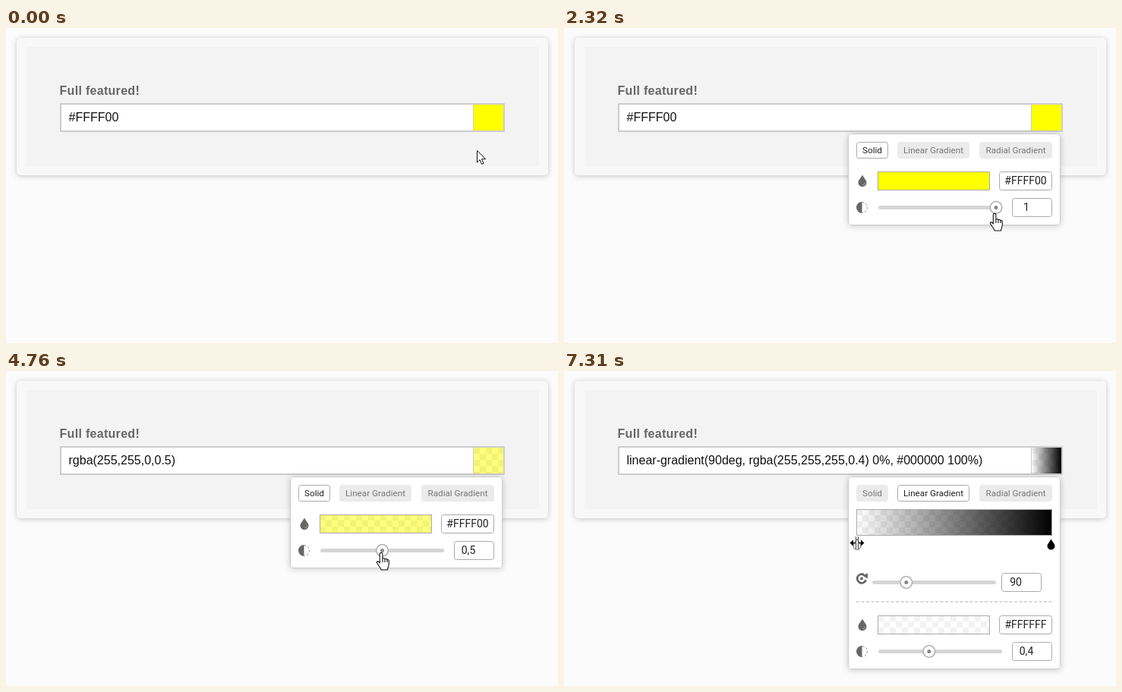
Write an HTML page with a canvas that moves like this. It is 727x415 px and loops after 8 s.

```html
<!DOCTYPE html>
<html lang="en">
<head>
<meta charset="utf-8">
<title>Color picker</title>
<style>
html, body { margin: 0; width: 100%; height: 100%; overflow: hidden; background: #fbfbfb; }
canvas { display: block; }
</style>
</head>
<body>
<canvas id="stage" width="727" height="415"></canvas>
<script>
const ctx = document.getElementById('stage').getContext('2d');
const LOOP = 8000;
const UI = 'Roboto, sans-serif', PAGE = '"Liberation Sans", Arial, sans-serif';

// Pointer path: step, x, y of the hot spot. One step lasts about 111 ms.
const POINTER = [
  [0, 620, 161], [1, 621, 156], [3, 626, 134], [5, 631, 115], [7, 631, 115], [10, 643, 121],
  [11, 644, 122], [13, 644, 122], [15, 628, 126], [18, 588, 210], [20, 567, 244],
  [23, 569, 239], [24, 565, 239], [28, 480, 239], [30, 437, 239], [31, 470, 239],
  [34, 483, 239], [40, 486, 239], [41, 494, 239], [42, 494, 239], [45, 515, 223],
  [48, 533, 193], [51, 482, 169], [53, 482, 169], [54, 482, 168], [57, 482, 166],
  [59, 482, 167], [63, 387, 226], [64, 387, 226], [65, 386, 226]
];
const PANEL = [[11, 0], [12, 0.6], [13, 0.9], [14, 1]];
const PRESSES = [[10, 11], [24, 40], [56, 57]];

const HAND = new Path2D('M-1.7 13V2A1.8 1.8 0 0 1 1.9 2V8.5A1.7 1.7 0 0 1 5 9A1.7 1.7 0 0 1 8 10A1.4 1.4 0 0 1 10.3 11.2V15C10.3 18 8.8 19 8.5 23H0C-.5 20-3 18-5.5 13.8C-6.2 11.5-3.8 11-1.7 14ZM1.9 8.5V13M5 9.5V13M8 10.5V13');
const ARROW = new Path2D('M.5 .5V16L4.1 12.6L6.5 18.4L8.9 17.3L6.5 11.7H11.5Z');
const RESIZE = new Path2D('M-9.5 0L-5-4.5V-1H-2V1H-5V4.5ZM9.5 0L5-4.5V-1H2V1H5V4.5ZM-2-8.5H-1V8.5H-2ZM1-8.5H2V8.5H1Z');
const DROP = new Path2D('M0-8C2-4 5.5-1 5.5 2.2A5.5 5.5 0 0 1-5.5 2.2C-5.5-1-2-4 0-8Z');

function track(keys, step) {
  const next = keys.findIndex(k => k[0] > step);
  if (next === 0) return keys[0].slice(1);
  if (next < 0) return keys[keys.length - 1].slice(1);
  const a = keys[next - 1], b = keys[next];
  const p = (step - a[0]) / (b[0] - a[0]);
  return a.slice(1).map((v, i) => v + (b[i + 1] - v) * p);
}

function box(x, y, w, h, r, fill, stroke) {
  ctx.beginPath();
  const inset = stroke ? 0.5 : 0;
  ctx.roundRect(x + inset, y + inset, w - 2 * inset, h - 2 * inset, r);
  if (fill) { ctx.fillStyle = fill; ctx.fill(); }
  if (stroke) { ctx.strokeStyle = stroke; ctx.lineWidth = 1; ctx.stroke(); }
}

function shadowBox(x, y, w, h, r, fill, blur, strength) {
  ctx.save();
  ctx.shadowColor = `rgba(0,0,0,${strength})`;
  ctx.shadowBlur = blur;
  ctx.shadowOffsetY = 1;
  box(x, y, w, h, r, fill);
  ctx.restore();
}

function text(str, x, y, font, color, align = 'left') {
  ctx.font = font;
  ctx.fillStyle = color;
  ctx.textAlign = align;
  ctx.fillText(str, x, y);
}

function circle(x, y, r, fill, stroke, width = 1.3) {
  ctx.beginPath();
  ctx.arc(x, y, r, 0, 2 * Math.PI);
  if (fill) { ctx.fillStyle = fill; ctx.fill(); }
  if (stroke) { ctx.strokeStyle = stroke; ctx.lineWidth = width; ctx.stroke(); }
}

function shape(path, x, y, fill, stroke, width = 1.1, scale = 1) {
  ctx.save();
  ctx.translate(x, y);
  ctx.scale(scale, scale);
  ctx.lineJoin = 'round';
  if (stroke) { ctx.strokeStyle = stroke; ctx.lineWidth = width; }
  if (fill) { ctx.fillStyle = fill; ctx.fill(path); }
  if (stroke) ctx.stroke(path);
  ctx.restore();
}

function checkered(x, y, w, h, fill) {
  ctx.save();
  ctx.beginPath();
  ctx.rect(x, y, w, h);
  ctx.clip();
  ctx.fillStyle = '#fff';
  ctx.fillRect(x, y, w, h);
  ctx.fillStyle = '#e8e8e8';
  for (let row = 0; row * 8 < h; row++)
    for (let col = row % 2; col * 8 < w; col += 2) ctx.fillRect(x + col * 8, y + row * 8, 8, 8);
  ctx.fillStyle = fill;
  ctx.fillRect(x, y, w, h);
  ctx.restore();
}

// Translucent white to black, blended with premultiplied alpha as CSS does.
function fade(x, w) {
  const g = ctx.createLinearGradient(x, 0, x + w, 0);
  for (let p = 0; p <= 1; p += 0.125) {
    const alpha = 0.4 + 0.6 * p, grey = Math.round(102 * (1 - p) / alpha);
    g.addColorStop(p, `rgba(${grey},${grey},${grey},${alpha})`);
  }
  return g;
}

function page(value, paint) {
  ctx.fillStyle = '#fbfbfb';
  ctx.fillRect(0, 0, 727, 415);
  shadowBox(14, 13, 700, 181, 5, '#f8f8f8', 7, 0.22);
  box(27, 25, 675, 157, 0, '#f3f3f3');
  ctx.letterSpacing = '0.3px';
  text('Full featured!', 70.5, 88, `bold 16px ${PAGE}`, '#666');
  ctx.letterSpacing = '0px';
  box(71, 99, 586, 38, 1, '#ccc');
  box(73, 101, 542, 34, 0, '#fff');
  text(value, 82.5, 123, `16px ${PAGE}`, '#111');
  checkered(616, 101, 39, 34, paint);
}

function tab(label, x, w, active) {
  box(x, 150, w, 22, 3, active ? '#fff' : '#ebebeb', active ? '#aaa' : '#ebebeb');
  text(label, x + w / 2, 165, `11.7px ${UI}`, active ? '#222' : '#777', 'center');
}

function field(value, x, y, w, shift = 0) {
  box(x, y, w, 25, 3, '#fff', '#aaa');
  text(value, x + w / 2 - shift, y + 17, `14px ${UI}`, '#222', 'center');
}

function slider(x, y, ratio, value) {
  box(x, y - 2.5, 163, 5, 2.5, '#d5d5d5');
  const knob = x + 8 + 147 * ratio;
  circle(knob, y, 7.8, '#fff', '#a5a5a5');
  circle(knob, y, 2.5, '#888');
  field(value, x === 414 ? 590 : 576, Math.round(y - 12.5), 53, 7.5);
}

function colorRows(dy, hex, paint, alpha) {
  shape(DROP, 393, 201.5 + dy, '#666');
  ctx.beginPath();
  ctx.arc(393, 203.5 + dy, 3.5, 0.1, 1.5);
  ctx.strokeStyle = '#aaa';
  ctx.lineWidth = 1;
  ctx.stroke();
  checkered(413, 189 + dy, 148, 25, paint);
  box(413, 189 + dy, 148, 25, 0, null, '#aaa');
  field(hex, 573, 189 + dy, 70);

  const y = 236.5 + dy;
  ctx.beginPath();
  ctx.arc(392.5, y, 7.5, Math.PI / 2, Math.PI * 1.5);
  ctx.fillStyle = '#666';
  ctx.fill();
  ctx.beginPath();
  ctx.arc(392.5, y, 6.9, -Math.PI / 2, Math.PI / 2);
  ctx.strokeStyle = '#888';
  ctx.setLineDash([3, 2]);
  ctx.stroke();
  ctx.setLineDash([]);
  slider(414, y, alpha, String(alpha).replace('.', ','));
}

function gradientControls() {
  checkered(385, 182, 258, 35, fade(385, 258));
  box(385, 182, 258, 35, 0, null, '#aaa');
  shape(DROP, 386, 228.5, '#f5f5f5', '#777', 1.2, 0.9);
  shape(DROP, 641.5, 228.5, '#000', '#fff', 0.6, 0.95);

  ctx.beginPath();
  ctx.arc(392, 273.5, 5.8, 0.3, 5.3);
  ctx.strokeStyle = '#666';
  ctx.lineWidth = 2.8;
  ctx.stroke();
  shape(new Path2D('M1-4L8-7V0Z'), 392, 273.5, '#666');
  circle(392, 273.5, 2, '#666');
  slider(406, 278.5, 0.25, '90');

  ctx.beginPath();
  ctx.moveTo(385, 304);
  ctx.lineTo(643, 304);
  ctx.strokeStyle = '#ccc';
  ctx.lineWidth = 1.5;
  ctx.setLineDash([4, 2.5]);
  ctx.stroke();
  ctx.setLineDash([]);
}

function panel(shown, linear, paint, alpha) {
  if (!shown) return;
  const scale = 0.86 + 0.14 * shown, height = linear ? 254 : 121;
  ctx.save();
  ctx.globalAlpha = shown;
  ctx.translate(514, 199.5);
  ctx.scale(scale, scale);
  ctx.translate(-514, -199.5);
  shadowBox(374, 139, 280, height, 4, '#fff', 8, 0.2);
  box(374, 139, 280, height, 4, '#fff', '#ccc');
  tab('Solid', 385, 42, !linear);
  tab('Linear Gradient', 439, 95, linear);
  tab('Radial Gradient', 547, 96, false);
  if (linear) {
    gradientControls();
    colorRows(133, '#FFFFFF', 'rgba(255,255,255,0.4)', 0.4);
  } else {
    colorRows(0, '#FFFF00', paint, alpha);
  }
  ctx.restore();
}

function pointer(step, x, y) {
  if (PRESSES.some(([from, to]) => step >= from && step <= to))
    circle(x, y - 3, 11, 'rgba(240,228,0,0.6)');
  if (step >= 63) shape(RESIZE, x, y + 0.5, '#000', 'rgba(255,255,255,0.5)', 0.6);
  else if (step < 3 || step > 60) shape(ARROW, x, y, '#fff', '#111', 1);
  else shape(HAND, x, y, '#fff', '#111');
}

function draw(now) {
  const t = now % LOOP;
  const step = Math.max(0, Math.floor((t - 199) / 110.9) + 1);
  const [x, y] = track(POINTER, step);
  const linear = step >= 58;

  let alpha = step < 24 ? 1 : 0.5;
  if (step >= 24 && step <= 41) alpha = Math.min(10, Math.round((x - 422) / 14.7)) / 10;
  const rgba = `rgba(255,255,0,${alpha})`;
  const value = linear ? 'linear-gradient(90deg, rgba(255,255,255,0.4) 0%, #000000 100%)'
    : alpha < 1 ? rgba : '#FFFF00';

  page(value, linear ? fade(616, 39) : rgba);
  panel(track(PANEL, step)[0], linear, rgba, alpha);
  pointer(step, x, y);
}

const start = performance.now();
function frame() {
  draw(performance.now() - start);
  requestAnimationFrame(frame);
}
frame();
</script>
</body>
</html>
```
